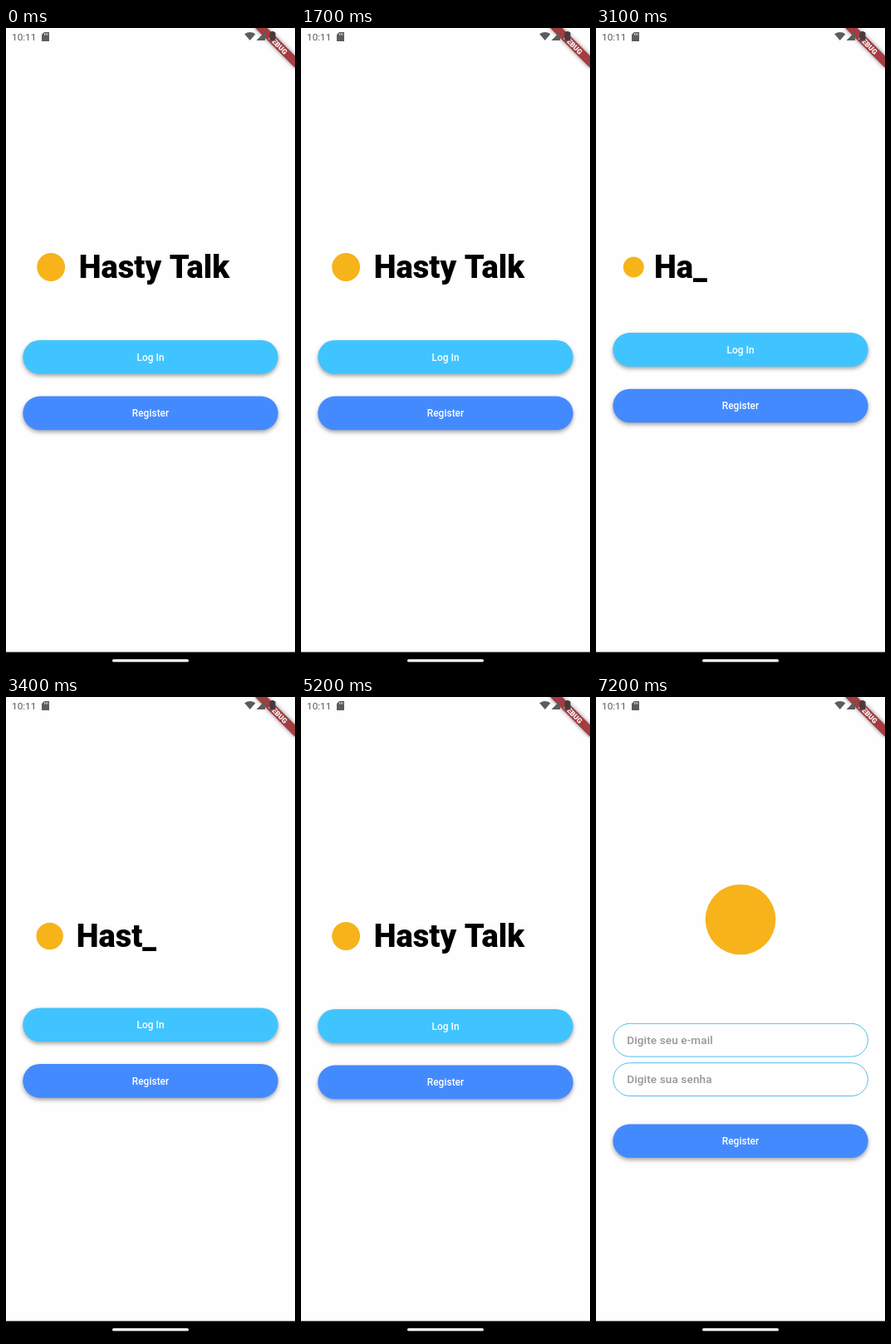
These frames come from a looping animation (348 by 772 pixels, 8000 ms). An HTML page with a canvas:

```html
<!DOCTYPE html>
<html lang="en">
<head>
<meta charset="utf-8">
<title>Hasty Talk</title>
<style>
  html, body { margin: 0; width: 100%; height: 100%; overflow: hidden; background: #fefefe; }
  canvas { display: block; width: 348px; height: 772px; }
</style>
</head>
<body>
<canvas id="stage"></canvas>
<script>
const W = 348, H = 772, LOOP = 8000, STEP = 100;
const DP = 0.847; // pixels per layout unit
const TITLE = 'Hasty Talk';
const RESTART = 2600, REGISTER_AT = 7200;
const SKY = '#40c4ff', BLUE = '#448aff', AMBER = '#f6b31a', STATUS = '#5c5c5c';
const FAMILY = 'Roboto, "Open Sans", sans-serif';

const canvas = document.getElementById('stage');
const ctx = canvas.getContext('2d');
const ratio = window.devicePixelRatio || 1;
canvas.width = W * ratio;
canvas.height = H * ratio;

function text(str, x, y, size, weight, color, align = 'left', spacing = 0) {
  ctx.font = `${weight} ${size}px ${FAMILY}`;
  ctx.letterSpacing = `${spacing}px`;
  ctx.textAlign = align;
  ctx.textBaseline = 'alphabetic';
  ctx.fillStyle = color;
  ctx.fillText(str, x, y);
}

function pill(x, y, w, h) {
  ctx.beginPath();
  ctx.roundRect(x, y, w, h, h / 2);
}

function shape(points, color) {
  ctx.beginPath();
  points.forEach(([x, y]) => ctx.lineTo(x, y));
  ctx.closePath();
  ctx.fillStyle = color;
  ctx.fill();
}

function shadow(color, blur, dy) {
  ctx.shadowColor = color;
  ctx.shadowBlur = blur * ratio;
  ctx.shadowOffsetY = dy * ratio;
}

function button(label, y, color) {
  ctx.save();
  shadow('rgba(0,0,0,.36)', 5, 2.5);
  pill(20.3, y, 307.4, 40.6);
  ctx.fillStyle = color;
  ctx.fill();
  ctx.restore();
  text(label, W / 2, y + 24.6, 14 * DP, 500, '#fff', 'center', 0.05);
}

function field(hint, y) {
  pill(20.8, y, 306.6, 39.8);
  ctx.lineWidth = 1;
  ctx.strokeStyle = '#4fc0ee';
  ctx.stroke();
  text(hint, 37.2, y + 24.7, 16 * DP, 500, '#979797', 'left', 0.12);
}

function dot(x, y, r) {
  ctx.beginPath();
  ctx.arc(x, y, r, 0, Math.PI * 2);
  ctx.fillStyle = AMBER;
  ctx.fill();
}

// Text typed so far, with the cursor blinking once everything is there.
function typed(t) {
  const n = Math.floor((t - RESTART) / 200), extra = n - TITLE.length;
  if (t < RESTART + STEP || t >= 6300) return TITLE;
  if (n < 1) return '';
  const cursor = extra <= 0 || extra % 2 === 0;
  return TITLE.slice(0, n) + (cursor ? '_' : '');
}

function logoSize(t) {
  const full = 80 * DP;
  if (t < RESTART + STEP) return full;
  const p = Math.min(1, (t - RESTART - 13) / 1000);
  return full * (1 - (1 - p) ** 2);
}

function welcome(t) {
  const size = logoSize(t), full = 80 * DP;
  const lift = (full - Math.max(size, 45)) / 2;
  dot(20.3 + size / 2, 288, size / 4);
  text(typed(t), 20 + size, 301.4, 45 * DP, 900, '#000');
  button('Log In', 376 - lift, SKY);
  button('Register', 443.6 - lift, BLUE);
}

function register() {
  dot(W / 2, 268, 50 * DP);
  field('Digite seu e-mail', 393.3);
  field('Digite sua senha', 440.7);
  button('Register', 514.4, BLUE);
}

function banner() {
  ctx.save();
  ctx.translate(W, 0);
  ctx.rotate(Math.PI / 4);
  const off = 40 * DP, h = 12 * DP;
  ctx.save();
  shadow('rgba(0,0,0,.5)', 5, 0);
  ctx.fillStyle = '#a43c40';
  ctx.fillRect(-off, off - h, off * 2, h);
  ctx.restore();
  text('DEBUG', 0, off - h / 2 + 3.1, 10.2 * DP, 900, '#fff', 'center');
  ctx.restore();
}

function statusBar() {
  text('10:11', 7, 15, 11.8, 400, STATUS);

  // memory card
  shape([[46, 5], [52, 5], [52, 16], [43, 16], [43, 8]], STATUS);
  ctx.fillStyle = '#fefefe';
  for (let i = 0; i < 3; i++) ctx.fillRect(46 + i * 1.8, 6.3, 0.8, 2.3);

  // wifi
  ctx.beginPath();
  ctx.moveTo(293.8, 15);
  ctx.lineTo(287.2, 7.2);
  ctx.quadraticCurveTo(293.8, 2.6, 300.4, 7.2);
  ctx.closePath();
  ctx.fillStyle = STATUS;
  ctx.fill();

  // signal
  shape([[312, 4.5], [312, 15], [301.5, 15]], STATUS);

  // battery
  ctx.fillStyle = '#4a3a3c';
  ctx.fillRect(319.2, 4, 3.4, 2);
  ctx.beginPath();
  ctx.roundRect(317.3, 5, 7.2, 10.6, 1);
  ctx.fill();
}

function navBar() {
  ctx.fillStyle = '#000';
  ctx.fillRect(0, 751.6, W, H - 751.6);
  pill(128, 760.3, 92, 3.2);
  ctx.fillStyle = '#fff';
  ctx.fill();
}

function draw(now) {
  const t = Math.floor((now % LOOP) / STEP) * STEP;
  ctx.setTransform(ratio, 0, 0, ratio, 0, 0);
  ctx.fillStyle = '#fefefe';
  ctx.fillRect(0, 0, W, H);
  if (t < REGISTER_AT) welcome(t);
  else register();
  banner();
  statusBar();
  navBar();
}

let start;
function tick(now) {
  start ??= now;
  draw(now - start);
  requestAnimationFrame(tick);
}
draw(0);
requestAnimationFrame(tick);
</script>
</body>
</html>
```
